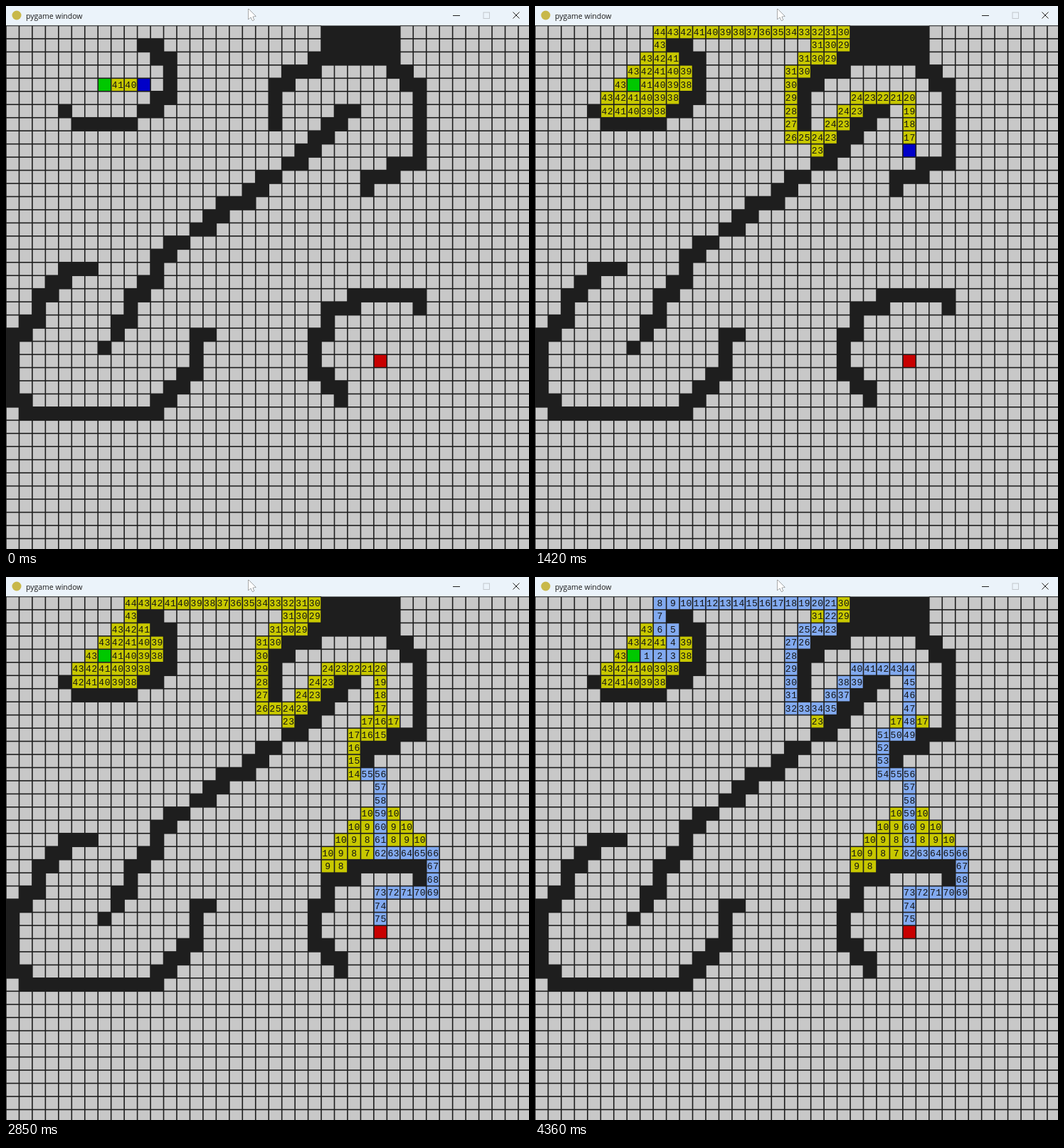
An HTML page with a canvas that plays this animation: 735x762 px, repeating every 4.39 s.

```html
<!DOCTYPE html>
<html>
<head>
<meta charset="utf-8">
<title>pygame window</title>
<style>
html, body { margin: 0; height: 100%; overflow: hidden; background: #1e1e1e; }
canvas { display: block; }
</style>
</head>
<body>
<canvas id="stage" width="735" height="762"></canvas>
<script>
const ctx = document.getElementById('stage').getContext('2d');
const LOOP = 4390, FRAME = 30.27, STEPS_PER_FRAME = 1.445, FIRST_STEP = 3;
const N = 40, CELL = 18.46, TOP = 27.5;
const DARK = '#1e1e1e', FREE = '#c8c8c8', SEEN = '#c8c800', PATH = '#82aaf0',
      CURRENT = '#0000c8', START = '#00c800', GOAL = '#c80000';
const start = { x: 7, y: 4 }, goal = { x: 28, y: 25 };
const id = (x, y) => y * N + x;

// Walls: a starting cell and a walk (z = down-left, q = up-left).
const MOVES = { u: [0, -1], d: [0, 1], l: [-1, 0], r: [1, 0], z: [-1, 1], q: [-1, -1] };
const walls = new Set();
for (const [x0, y0, walk] of [
  [10, 1, 'rdrdddldlzllllq'],
  [20, 7, 'uuururrurrrrrrulllllurrrrr'],
  [29, 3, 'rdrddddddlldlld'],
  [26, 6, 'ldldldldlzldldlldldlzldlddldlddldz'],
  [6, 18, 'lldldlddldldddddrdrrrrrrrrrrurururuuur'],
  [31, 21, 'ullllldllddldddrdrd']
]) {
  let x = x0, y = y0;
  walls.add(id(x, y));
  for (const step of walk) {
    x += MOVES[step][0];
    y += MOVES[step][1];
    walls.add(id(x, y));
  }
}

// Greedy best-first search; ties go to the upper, then the left cell.
function search() {
  const dist = (x, y) => Math.abs(goal.x - x) + Math.abs(goal.y - y);
  const open = [{ ...start, h: dist(start.x, start.y) }];
  const known = new Set([id(start.x, start.y)]), order = [];
  while (open.length) {
    open.sort((a, b) => a.h - b.h || a.y - b.y || a.x - b.x);
    const cell = open.shift();
    if (!cell.h) {
      const path = [];
      for (let c = cell.from; c.from; c = c.from) path.unshift(c);
      return { order, path };
    }
    order.push(cell);
    for (const m of 'urdl') {
      const x = cell.x + MOVES[m][0], y = cell.y + MOVES[m][1], key = id(x, y);
      if (x < 0 || y < 0 || x >= N || y >= N || walls.has(key) || known.has(key)) continue;
      known.add(key);
      open.push({ x, y, h: dist(x, y), from: cell });
    }
  }
}
const { order, path } = search();

function drawCell({ x, y }, color, label) {
  const left = x * CELL, top = TOP + y * CELL;
  ctx.fillStyle = DARK;
  ctx.fillRect(left, top, CELL, CELL);
  ctx.fillStyle = color;
  ctx.fillRect(left + 0.8, top + 0.8, CELL - 1.6, CELL - 1.6);
  if (label === undefined) return;
  ctx.fillStyle = '#141414';
  ctx.fillText(label, left + CELL / 2 + 0.3, top + CELL / 2 + 4.2);
}

function drawLines(color, ...lines) {
  ctx.strokeStyle = color;
  ctx.lineWidth = 1;
  ctx.beginPath();
  for (const [x1, y1, x2, y2] of lines) {
    ctx.moveTo(x1, y1);
    ctx.lineTo(x2, y2);
  }
  ctx.stroke();
}

function drawTitleBar() {
  ctx.fillStyle = '#ebf3fa';
  ctx.fillRect(0, 0, 735, 27.5);
  ctx.fillStyle = '#c8b84a';
  ctx.beginPath();
  ctx.arc(15, 13, 6.5, 0, 7);
  ctx.fill();
  ctx.fillStyle = '#1a1a1a';
  ctx.font = '10.5px "Open Sans", "Noto Sans", sans-serif';
  ctx.letterSpacing = '0px';
  ctx.textAlign = 'left';
  ctx.fillText('pygame window', 28, 17.5);
  drawLines('#222', [628, 13.5, 638, 13.5], [712.5, 8.5, 721.5, 17.5], [721.5, 8.5, 712.5, 17.5]);
  ctx.strokeStyle = '#c2c8cd';
  ctx.strokeRect(671, 9, 8.5, 8.5);
  // Mouse pointer
  ctx.fillStyle = '#fff';
  ctx.strokeStyle = '#555';
  ctx.stroke(pointer);
  ctx.fill(pointer);
}
const pointer = new Path2D('M340.5 4V18.5L344 15.5L346.5 20.5L348.5 19.5L346.5 14.7L351 14.5Z');

function draw(now) {
  const frame = Math.floor((now % LOOP) / FRAME + 0.1);
  const step = FIRST_STEP + Math.floor(frame * STEPS_PER_FRAME);
  const last = order.length - 1;

  ctx.fillStyle = DARK;
  ctx.fillRect(0, 0, 735, 762);
  drawTitleBar();
  ctx.font = '13px "Liberation Mono", "Courier New", monospace';
  ctx.letterSpacing = '0.6px';
  ctx.textAlign = 'center';

  for (let y = 0; y < N; y++)
    for (let x = 0; x < N; x++)
      if (!walls.has(id(x, y))) drawCell({ x, y }, FREE);
  for (const cell of order.slice(1, step)) drawCell(cell, SEEN, cell.h);
  if (step <= last) drawCell(order[step], CURRENT);
  const hidden = Math.max(0, path.length - Math.max(0, step - last));
  for (let i = hidden; i < path.length; i++) drawCell(path[i], PATH, i + 1);
  drawCell(start, START);
  drawCell(goal, GOAL);
  requestAnimationFrame(draw);
}
requestAnimationFrame(draw);
</script>
</body>
</html>
```
